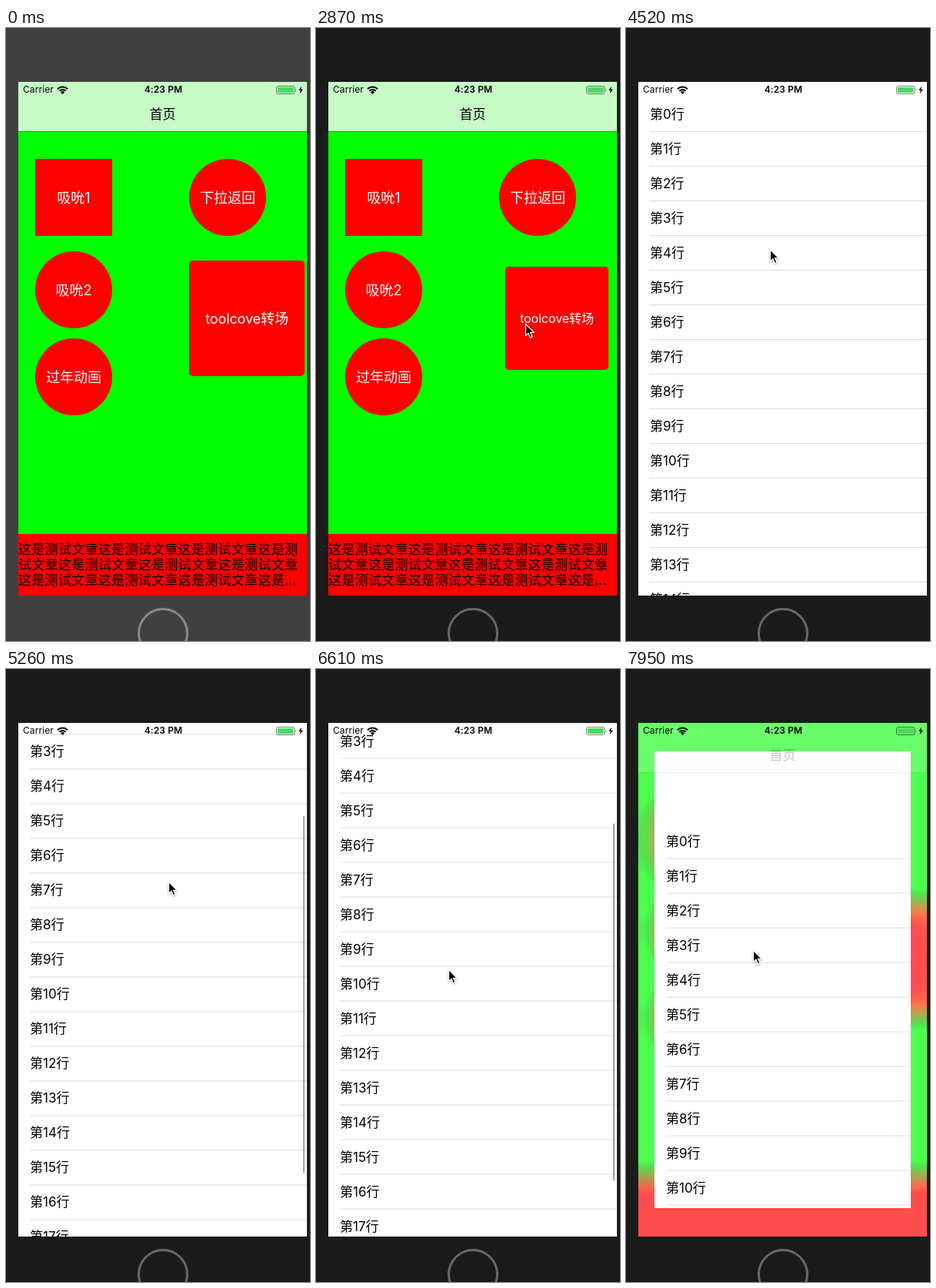
An HTML page for the animation above (8000 ms loop, 395 by 796 pixels).

```html
<!DOCTYPE html>
<html lang="zh">
<head>
<meta charset="utf-8">
<title>转场</title>
<style>
  html, body { margin: 0; width: 100%; height: 100%; overflow: hidden; }
  body { position: relative; font: 17px Inter, "Noto Sans CJK SC", "Noto Sans CJK", sans-serif; color: #000; }
  div, svg { position: absolute; box-sizing: border-box; }
  #phone { inset: 0; overflow: hidden; background: #404040; --ring: #8a8a8a; }
  #phone.active { background: #1b1b1b; --ring: #686868; }
  #ring { left: 170.5px; top: 753px; width: 66px; height: 66px; border: 3px solid var(--ring); border-radius: 50%; }
  #screen { left: 16px; top: 70px; width: 375px; height: 667px; overflow: hidden; background: #0f0; }
  #scene { inset: 0; }
  #scene.blurred { filter: blur(20px) saturate(1.8); }
  .home { left: 0; top: -80px; width: 375px; height: 827px; background: #0f0; }
  .mirror { display: none; }
  .blurred .mirror { display: block; }
  .btn { width: 100px; height: 100px; background: #f00; color: #fff; font-size: 18px; line-height: 101px; text-align: center; white-space: nowrap; }
  .round { border-radius: 50%; }
  .store { width: 150px; height: 150px; line-height: 151px; border-radius: 5px; letter-spacing: -.1px; }
  .article { left: 0; top: 667px; width: 375px; height: 160px; padding-top: 9.8px; background: #f00; line-height: 20.3px; letter-spacing: .3px; white-space: pre; }
  #veil { inset: 0; background: rgba(255,255,255,.3); }
  #card { overflow: hidden; background: #fff; }
  #list { width: 375px; height: 900px; }
  .row { left: 15px; width: 360px; height: 45px; line-height: 44px; border-bottom: 1px solid #dddde0; white-space: nowrap; }
  #bar { left: 369.5px; width: 2.5px; height: 464px; border-radius: 2px; background: rgba(0,0,0,.36); }
  #nav { left: 0; top: 0; width: 375px; height: 65px; background: rgba(249,249,249,.8) padding-box; border-bottom: 1px solid rgba(0,0,0,.3); font-weight: 500; line-height: 84px; text-align: center; }
  #status { left: 0; top: 0; width: 375px; height: 20px; font-size: 12px; line-height: 20px; }
  #carrier { left: 6px; letter-spacing: .1px; }
  #clock { left: 0; width: 377px; text-align: center; font-weight: 600; letter-spacing: .1px; }
  #icons { left: 0; top: 0; }
  #cursor { left: -2px; top: -2px; overflow: visible; filter: drop-shadow(0 1px 1px rgba(0,0,0,.35)); }
</style>
</head>
<body>
<div id="phone">
  <div id="ring"></div>
  <div id="screen">
    <div id="scene">
      <div class="home">
        <div class="btn" style="left:22px;top:180px">吸吮1</div>
        <div class="btn round" style="left:22px;top:300px">吸吮2</div>
        <div class="btn round" style="left:22px;top:413px">过年动画</div>
        <div class="btn round" style="left:222px;top:180px">下拉返回</div>
        <div class="btn store" style="left:222px;top:312px">toolcove转场</div>
        <div class="article"></div>
      </div>
    </div>
    <div id="veil"></div>
    <div id="card"><div id="list"></div></div>
    <div id="bar"></div>
    <div id="nav">首页</div>
    <div id="status">
      <div id="carrier">Carrier</div>
      <div id="clock">4:23 PM</div>
      <svg id="icons" width="375" height="20">
        <g fill="none" stroke="#000" stroke-width="2.1">
          <path d="M51 9.2a9.2 9.2 0 0 1 13 0"/>
          <path d="M53.4 11.8a5.8 5.8 0 0 1 8.2 0"/>
        </g>
        <path d="M57.5 16l-2.5-2.6a3.5 3.5 0 0 1 5 0z"/>
        <rect x="335.5" y="5.5" width="23.5" height="10" rx="2.2" fill="none" stroke="#000" stroke-opacity=".5"/>
        <rect x="337" y="7" width="20.5" height="7" rx=".8" fill="#4cd964"/>
        <path d="M360.2 8.8q1.6 1.7 0 3.4z" fill-opacity=".6"/>
        <path d="M368.2 5.8l-4 5h2.6l-1.2 4.4 4.4-5.4h-2.7z"/>
      </svg>
    </div>
  </div>
  <svg id="cursor" width="16" height="24">
    <path d="M2.5 2.5v15l3.4-3.2 2.5 5.7 2.6-1.1-2.5-5.6h4.7z" stroke="#fff" stroke-width="1.2"/>
  </svg>
</div>
<script>
const LOOP = 8000;
const $ = id => document.getElementById(id);
const phone = $('phone'), scene = $('scene'), veil = $('veil'), card = $('card'),
      list = $('list'), bar = $('bar'), nav = $('nav'), cursor = $('cursor');
const home = scene.querySelector('.home'), store = home.querySelector('.store');

const phrase = '这是测试文章', many = phrase.repeat(7);
home.querySelector('.article').textContent =
  many.slice(0, 21) + '\n' + many.slice(21) + '\n' + phrase.repeat(3) + '这是...';

// Mirrored neighbours let the blur reflect at the screen edges.
for (const side of [-1, 1]) {
  const copy = home.cloneNode(true);
  copy.classList.add('mirror');
  copy.style.transform = `translateX(${375 * side}px) scaleX(-1)`;
  scene.append(copy);
}

for (let i = 0; i < 20; i++) {
  const row = document.createElement('div');
  row.className = 'row';
  row.style.top = i * 45 + 'px';
  row.textContent = `第${i}行`;
  list.append(row);
}

const mix = (a, b, f) => a + (b - a) * f;
const span = (k, from, to) => Math.min(1, Math.max(0, (k - from) / (to - from)));
const smooth = (k, from, to) => { const u = span(k, from, to); return u * u * (3 - 2 * u); };
const place = (el, x, y) => el.style.transform = `translate(${x}px,${y}px)`;

// Pointer moves: first step, last step, destination.
const moves = [
  [0, 3, 256, 387], [3, 8, 311, 766], [8, 12, 272, 384],
  [19, 22, 187, 184], [26, 28, 187, 391],
  [29, 32, 211, 276], [32, 36, 172, 239],
  [38, 41, 172, 390], [41, 45, 164, 198], [45, 50, 165, 365]
];
const pointer = k => moves.reduce(([x, y], [from, to, toX, toY]) => {
  const f = smooth(k, from, to);
  return [mix(x, toX, f), mix(y, toY, f)];
}, [327, 731]);

// Critically damped spring that opens the card.
function spring(k) {
  const n = 2.1 * Math.max(0, k - 17);
  return 1 - (1 + n) * Math.exp(-n);
}

// A flick slightly past the end, a settle, then the way back to the top.
function scroll(k) {
  const flick = 257 * (1 - (1 - span(k, 29, 36)) ** 1.4) - 4 * span(k, 36, 37);
  return flick * (1 - smooth(k, 38, 45));
}

// The picture advances in discrete steps of roughly 150 ms.
const stepAt = t => t < 500 ? -1
  : t < 2870 ? Math.min(15, Math.floor((t - 500) / 148))
  : 16 + Math.floor((t - 2870) / 149.4);

function draw(k) {
  const grow = spring(k), offset = scroll(k), pull = smooth(k, 45, 50);
  phone.classList.toggle('active', k >= 16);
  store.style.transform = k === 16 ? `scale(${134 / 150})` : 'none';
  cursor.style.display = k < 0 ? 'none' : 'block';
  place(cursor, ...pointer(k));

  // The card opens as a window over a fixed list, then shrinks around its centre.
  const inX = 21 * pull, inY = 37.3 * pull;
  const left = mix(222, 0, grow) + inX, top = mix(232, 0, grow) + inY;
  card.style.display = k >= 18 ? 'block' : 'none';
  card.style.left = left + 'px';
  card.style.top = top + 'px';
  card.style.width = mix(150, 375, grow) - 2 * inX + 'px';
  card.style.height = mix(150, 667, grow) - 2 * inY + 'px';
  place(list, inX - left, 20 - offset + 112 * pull - top);

  scene.classList.toggle('blurred', pull > 0);
  veil.style.display = pull > 0 ? 'block' : 'none';
  nav.style.opacity = (1 - grow) ** .7 + .21 * pull;
  bar.style.opacity = span(k, 29, 30) * (1 - span(k, 43, 46));
  place(bar, 0, 23 + offset * .7);
}

const start = performance.now();
let shown;
function tick() {
  const k = stepAt((performance.now() - start) % LOOP);
  if (k !== shown) draw(shown = k);
  requestAnimationFrame(tick);
}
tick();
</script>
</body>
</html>
```
